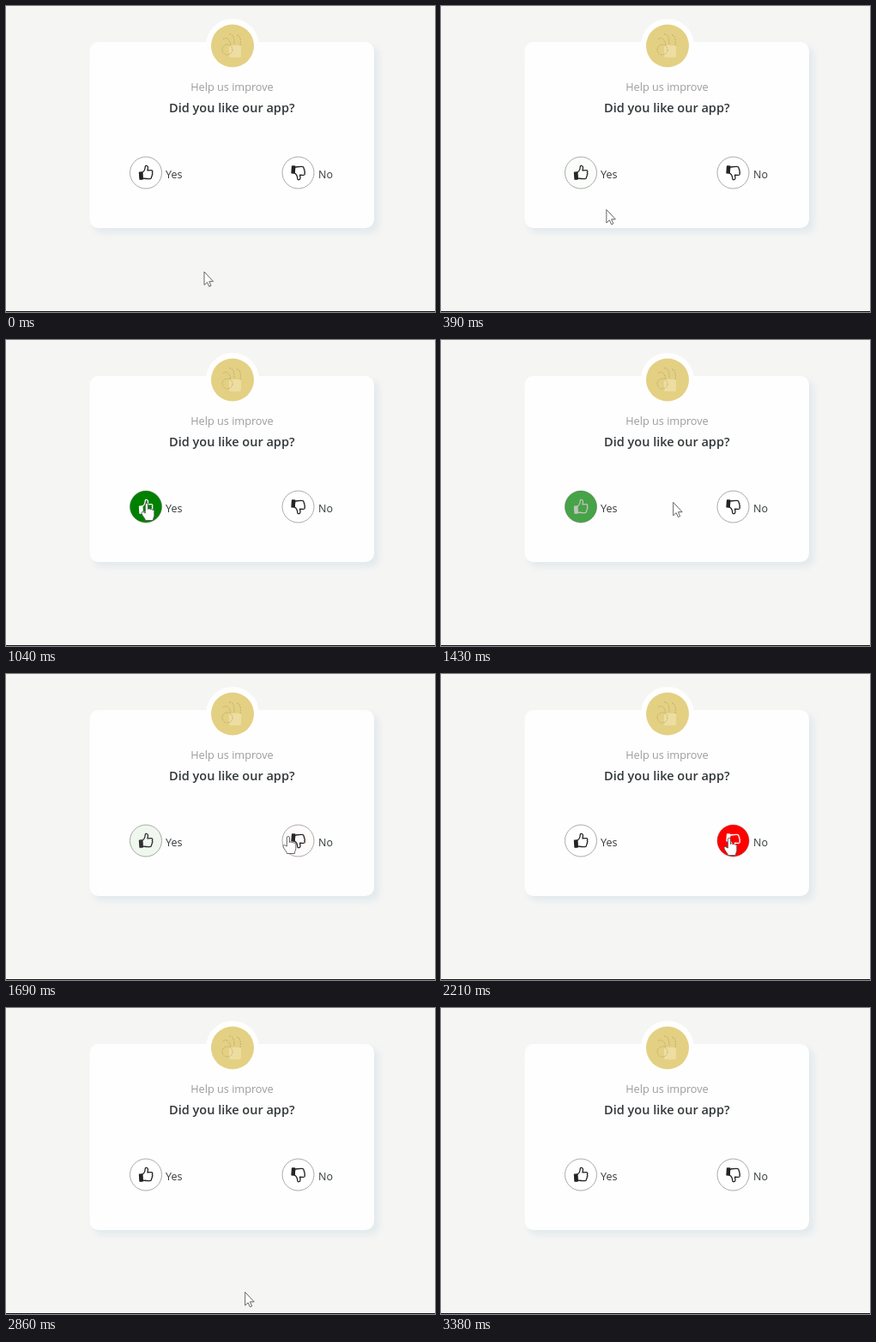
An HTML page that plays this animation: 500x357 px, repeating every 4030 ms.

```html
<!DOCTYPE html>
<html lang="en">
<head>
<meta charset="utf-8">
<title>Feedback card</title>
<style>
  html, body { margin: 0; width: 100%; height: 100%; overflow: hidden; background: #f5f5f4; }
  svg { display: block; width: 100%; height: 100%; }
  text { font-family: "Open Sans", "Noto Sans", sans-serif; fill: #33383b; }
  .small { font-size: 12.7px; fill: #9c9c9c; }
  .title { font-size: 14.5px; font-weight: 600; }
  .label { font-size: 12.5px; font-weight: 500; }
  .shadow { fill: #e3eaed; filter: blur(3px); }
  .button { fill: #fff; stroke: #aaa; }
  .icon { stroke-width: 1.3; stroke-linejoin: round; fill: none; }
  .cursor { fill: #fff; stroke: #555; stroke-width: .9; stroke-linejoin: round; }
  .sign { fill: none; stroke: #b5a673; stroke-width: .8; stroke-dasharray: 2 1; }
</style>
</head>
<body>
<svg viewBox="0 0 500 357">
  <defs>
    <g id="thumb" transform="rotate(-4)">
      <path d="M-7.500-.8h3.200v8h-3.200z" fill="currentColor"/>
      <path d="M-4.300-.6C-2-1.600-.6-4-.3-6.800c.2-2 3.100-1.800 3.200.6 0 1.600-.5 2.600-.8 3.800H6c2.200 0 2.300 2 1.300 2.700.8.900.6 2-.3 2.500.4 1 0 1.900-.8 2.300.2 1.500-.6 2.300-2.200 2.300C.6 7.400-1.500 6.700-4.300 6.200z"/>
    </g>
  </defs>

  <rect class="shadow" x="102" y="47" width="333" height="218" rx="11"/>
  <rect x="97.500" y="42" width="331.500" height="217" rx="10" fill="#fefefe"/>
  <circle cx="264" cy="46" r="31" fill="#fefefe"/>
  <circle cx="264" cy="46.500" r="25" fill="#e4d083"/>
  <rect x="260" y="46" width="14" height="14" rx="2" fill="#eddda0"/>
  <g class="sign">
    <circle cx="258" cy="51" r="6"/>
    <path d="M253 39c4-4 8 0 9 7M260 33c5-1 6 5 6 12M269 34c4 0 5 6 4 12"/>
  </g>

  <text class="small" x="263.500" y="99" text-anchor="middle">Help us improve</text>
  <text class="title" x="263.300" y="124" text-anchor="middle">Did you like our app?</text>

  <g id="yes">
    <circle class="button" cx="163" cy="194.500" r="18.500"/>
    <circle class="tint" cx="163" cy="194.500" r="18.500" fill="#008000"/>
    <use class="icon" href="#thumb" x="163" y="194.500"/>
    <text class="label" x="186" y="201">Yes</text>
  </g>
  <g id="no">
    <circle class="button" cx="340.500" cy="194.500" r="18.500"/>
    <circle class="tint" cx="340.500" cy="194.500" r="18.500" fill="#f00"/>
    <use class="icon" href="#thumb" transform="translate(340.500 194.500) scale(1 -1)"/>
    <text class="label" x="364" y="201">No</text>
  </g>

  <g id="cursor" class="cursor">
    <path id="arrow" d="M0 0V15.500L3.500 12.300 5.800 17.300 8 16.300 5.800 11.300H10.500z"/>
    <path id="hand" d="M-1.700 12V2a1.600 1.600 0 0 1 3.200 0V7.500a1.500 1.500 0 0 1 2.700.3 1.400 1.400 0 0 1 2.500.6 1.300 1.300 0 0 1 2.100 1V14.500c0 2-1.500 3.500-1.500 6H-1.500c0-2-3.800-5.500-4.500-8.300-.4-1.800 1.600-2.400 2.600-1z"/>
  </g>
  <rect y="356" width="500" height="1" fill="#111"/>
</svg>
<script>
  const TICK = 130, LOOP = 4030, FADE = 520;
  const $ = id => document.getElementById(id);

  const origin = { x: 231, y: 310 };
  const moves = [
    { from: 0, to: 130, x: 217, y: 279 },
    { from: 260, to: 650, x: 164, y: 188 },
    { from: 650, to: 1040, x: 164, y: 190 },
    { from: 1170, to: 1690, x: 329, y: 189 },
    { from: 1690, to: 1950, x: 336, y: 191 },
    { from: 2340, to: 3120, x: 265, y: 365 }
  ];
  const buttons = [
    { id: "yes", cx: 163, enter: 350, leave: 1250 },
    { id: "no", cx: 340.5, enter: 1650, leave: 2350 }
  ];

  const progress = (t, from, to) => Math.min(1, Math.max(0, (t - from) / (to - from)));
  const easeOut = u => 1 - (1 - u) ** 1.5;
  const smooth = u => u * u * (3 - 2 * u);
  const fade = (t, from) => smooth(progress(t, from, from + FADE));

  function pointer(t) {
    return moves.reduce((p, m) => {
      const k = easeOut(progress(t, m.from, m.to));
      return { x: p.x + (m.x - p.x) * k, y: p.y + (m.y - p.y) * k };
    }, origin);
  }

  function paint(id, level) {
    const tone = Math.round(35 + 220 * level);
    const icon = $(id).querySelector(".icon");
    icon.style.stroke = icon.style.color = `rgb(${tone},${tone},${tone})`;
    $(id).querySelector(".tint").style.opacity = level;
  }

  function draw(t) {
    const { x, y } = pointer(t);
    const over = buttons.some(b => Math.hypot(x - b.cx, y - 194.5) < 19);
    $("cursor").setAttribute("transform", `translate(${x} ${y})`);
    $("arrow").style.display = over ? "none" : "";
    $("hand").style.display = over ? "" : "none";
    for (const b of buttons) paint(b.id, fade(t, b.enter) - fade(t, b.leave));
  }

  // The picture advances in even ticks.
  const start = performance.now();
  function loop() {
    const t = (performance.now() - start) % LOOP;
    draw(Math.floor(t / TICK) * TICK);
    requestAnimationFrame(loop);
  }
  loop();
</script>
</body>
</html>
```
